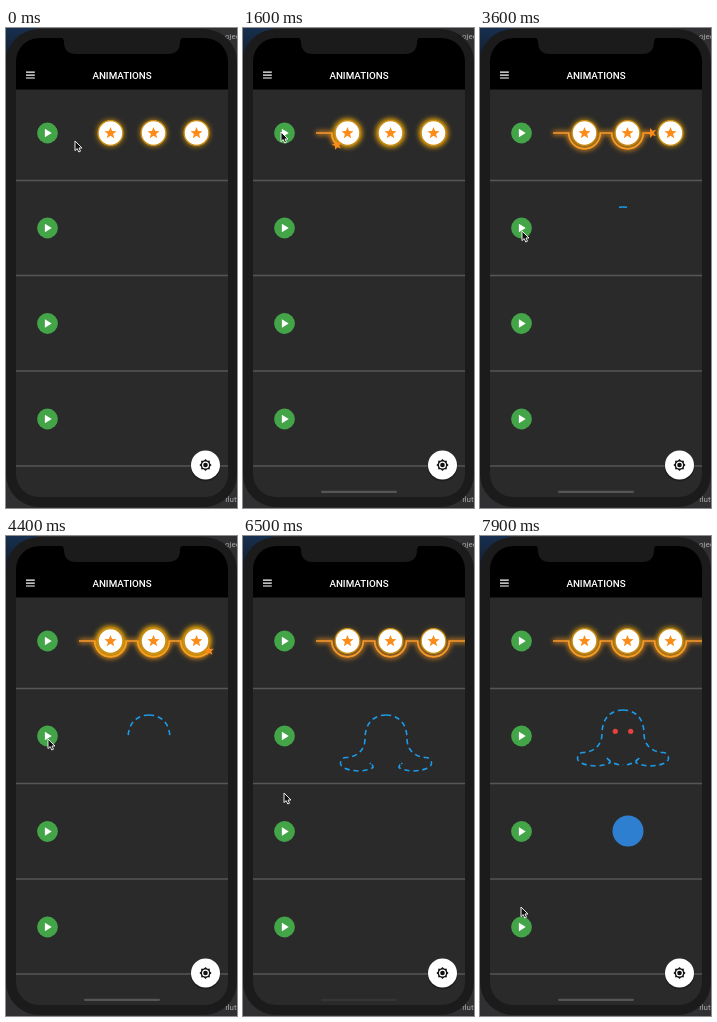
An HTML page that plays this animation: 231 px wide and 480 px high, repeating every 8 s.

```html
<!DOCTYPE html>
<html lang="en">
<head>
<meta charset="utf-8">
<title>Animations</title>
<style>
  html, body { margin: 0; width: 100%; height: 100%; overflow: hidden; background: #1b1b1b; }
  svg { display: block; width: 100vw; height: 100vh; }
  text { font-family: Roboto, Inter, sans-serif; }
</style>
</head>
<body>
<svg viewBox="0 0 231 480">
  <defs>
    <filter id="soft" filterUnits="userSpaceOnUse" x="50" y="70" width="180" height="75"><feGaussianBlur stdDeviation="2.6"/></filter>
    <clipPath id="screen"><rect x="10" y="10" width="212" height="459" rx="23"/></clipPath>
    <linearGradient id="corner" x2="0" y2="1">
      <stop stop-color="#17304f"/><stop offset="1" stop-color="#111722"/>
    </linearGradient>
    <path id="star" fill="#fb8c1a" d="M0-6 1.6-1.9 6-1.7 2.6 1 3.7 5.2 0 2.8-3.7 5.2-2.6 1-6-1.7-1.6-1.9Z"/>
    <g id="play"><circle r="10.4" fill="#43a548"/><path d="M-2.6-4.3V4.3L4.2 0Z" fill="#fff"/></g>
  </defs>

  <rect width="231" height="480" fill="#303032"/>
  <rect width="30" height="40" fill="url(#corner)"/>
  <text x="219" y="11" font-size="8" fill="#aaa">oject</text>
  <text x="219" y="474" font-size="8" fill="#aaa">flutter</text>
  <rect x="0" y="1" width="231" height="478" rx="33" fill="#1b1b1b"/>

  <g clip-path="url(#screen)">
    <rect width="231" height="480" fill="#2a2a2a"/>
    <rect width="231" height="61.5" fill="#000"/>
    <path d="M54 9Q58 10 58 14Q58 26 70 26H162Q174 26 174 14Q174 10 178 9Z" fill="#1b1b1b"/>
    <path d="M20 44.2H28.8M20 47.1H28.8M20 50H28.8" stroke="#fff" stroke-width="1.2"/>
    <text x="116" y="50.6" text-anchor="middle" font-size="9.8" font-weight="500" fill="#fff">ANIMATIONS</text>
    <path d="M10 152.5H222M10 247.5H222M10 343H222M10 438H222" stroke="#565656" stroke-width="1.5"/>
    <use href="#play" x="41.5" y="105"/>
    <use href="#play" x="41.5" y="200"/>
    <use href="#play" x="41.5" y="295.5"/>
    <use href="#play" x="41.5" y="391"/>

    <path class="track" fill="none" stroke="#ff9a1c" stroke-width="4" filter="url(#soft)" opacity=".75"/>
    <path class="track" fill="none" stroke="#f9982c" stroke-width="1.7"/>
    <g id="badges"></g>
    <use id="runner" href="#star"/>

    <g id="octopus">
      <path class="half" fill="none" stroke="#1d9be8" stroke-width="1.6"/>
      <path class="half" fill="none" stroke="#1d9be8" stroke-width="1.6" transform="translate(286 0) scale(-1 1)"/>
      <g id="eyes" fill="#e5433d"><circle cx="135.3" cy="200.3" r="2.6"/><circle cx="150.7" cy="200.3" r="2.6"/></g>
    </g>

    <circle id="dot" cx="148" cy="295" r="15.5" fill="#2f7fd0"/>

    <rect id="homeBar" x="78" y="462.7" width="76" height="2.2" rx="1.1" fill="#555"/>
    <circle cx="199.5" cy="438.5" r="15" fill="#000" opacity=".3"/>
    <circle cx="199.5" cy="437" r="14.5" fill="#fff"/>
    <g transform="translate(199.5 437)">
      <rect x="-4.3" y="-4.3" width="8.6" height="8.6" fill="#111"/>
      <rect x="-4.3" y="-4.3" width="8.6" height="8.6" fill="#111" transform="rotate(45)"/>
      <circle r="3.5" fill="#fff"/><circle r="2.3" fill="#111"/>
    </g>
  </g>

  <path id="cursor" d="M0 0V9.6L2.2 7.6 3.8 11 5.5 10.2 4 7H7Z" fill="#111" stroke="#fff" stroke-width=".9" stroke-linejoin="round"/>
</svg>

<script>
const LOOP = 8000;
const $ = id => document.getElementById(id);
const all = name => [...document.querySelectorAll(name)];
const clamp = v => Math.max(0, Math.min(1, v));
const progress = (t, from, to) => clamp((t - from) / (to - from));
const smooth = p => p * p * (3 - 2 * p);

// Eased interpolation through [time, ...values] stops.
function along(stops, t) {
  const i = Math.max(1, stops.findIndex(s => s[0] >= t));
  const [t0, ...a] = stops[i - 1], [t1, ...b] = stops[i];
  const p = smooth(progress(t, t0, t1));
  return a.map((v, k) => v + (b[k] - v) * p);
}

const cursorStops = [[0, 69, 113], [800, 38, 104], [1700, 38, 104], [2700, 43, 184], [3300, 42, 203],
  [4400, 42, 203], [5300, 41, 209], [5700, 41, 211], [6500, 41, 257], [6900, 41, 288],
  [7200, 41, 292], [7900, 41, 371], [8000, 41, 374]];
const glowStops = [[0, .45], [1300, .95], [2700, .08], [4600, 1], [6500, .1], [8000, .65]];
const barStops = [[0, 0], [800, 0], [1300, 1], [6000, 1], [6500, .25], [7000, 1], [8000, 1]];

const centers = [104.5, 147.5, 190.5];
const trackPath = 'M73 105' + centers.map(x => `H${x - 15.8}A15.8 15.8 0 0 0 ${x + 15.8} 105`).join('') + 'H230';
const halfPath = 'M143 179C130 179 122 188 122 203C122 214 114 221 103 221.5C96 222 96 230 101 232' +
  'C110 236 123 236 130 231.5C130 229 128 227.5 126.5 226.5C130 231 136 234 143 234';

const tracks = all('.track'), halves = all('.half');
tracks.forEach(p => p.setAttribute('d', trackPath));
halves.forEach(p => p.setAttribute('d', halfPath));
const trackLength = tracks[0].getTotalLength();
const halfLength = halves[0].getTotalLength();

$('badges').innerHTML = centers.map(x => `
  <circle class="glow" cx="${x}" cy="105" r="14" fill="#ffb300" filter="url(#soft)"/>
  <circle cx="${x}" cy="105" r="12.4" fill="#fff" stroke="#c98a12" stroke-width="1.3"/>
  <use href="#star" x="${x}" y="105"/>`).join('');
const glows = all('.glow');

// Dashes up to the given length, then nothing.
function dashesUpTo(length, on = 5.2, off = 3.8) {
  const parts = [];
  for (let s = 0; s < length; s += on + off) parts.push(Math.min(on, length - s), off);
  parts.push(0, 999);
  return parts.join(' ');
}

function draw(t) {
  const [cx, cy] = along(cursorStops, t);
  $('cursor').setAttribute('transform', `translate(${cx} ${cy})`);

  const [glow] = along(glowStops, t);
  glows.forEach(g => {
    g.setAttribute('r', 12.5 + 2.5 * glow);
    g.setAttribute('opacity', .25 + .75 * glow);
  });
  $('homeBar').setAttribute('opacity', along(barStops, t)[0]);

  const run = Math.min(trackLength, Math.max(0, (t - 1050) * .0528));
  const running = run > 0;
  tracks.forEach(p => {
    p.style.display = running ? '' : 'none';
    p.setAttribute('stroke-dasharray', `${run} 999`);
  });
  const tip = tracks[0].getPointAtLength(run);
  $('runner').style.display = running ? '' : 'none';
  $('runner').setAttribute('transform', `translate(${tip.x} ${tip.y}) rotate(${run * 2}) scale(.85)`);

  const drawn = progress(t, 3500, 6950) * halfLength;
  halves.forEach(p => {
    p.style.display = drawn ? '' : 'none';
    p.setAttribute('stroke-dasharray', dashesUpTo(drawn));
  });
  $('eyes').setAttribute('opacity', progress(t, 6950, 7150));
  $('octopus').setAttribute('transform', `translate(0 ${-5 * smooth(progress(t, 7100, 7850))})`);

  $('dot').setAttribute('r', 15.5 * smooth(progress(t, 7150, 7700)));
}

function frame() {
  draw(performance.now() % LOOP);
  requestAnimationFrame(frame);
}
frame();
</script>
</body>
</html>
```
